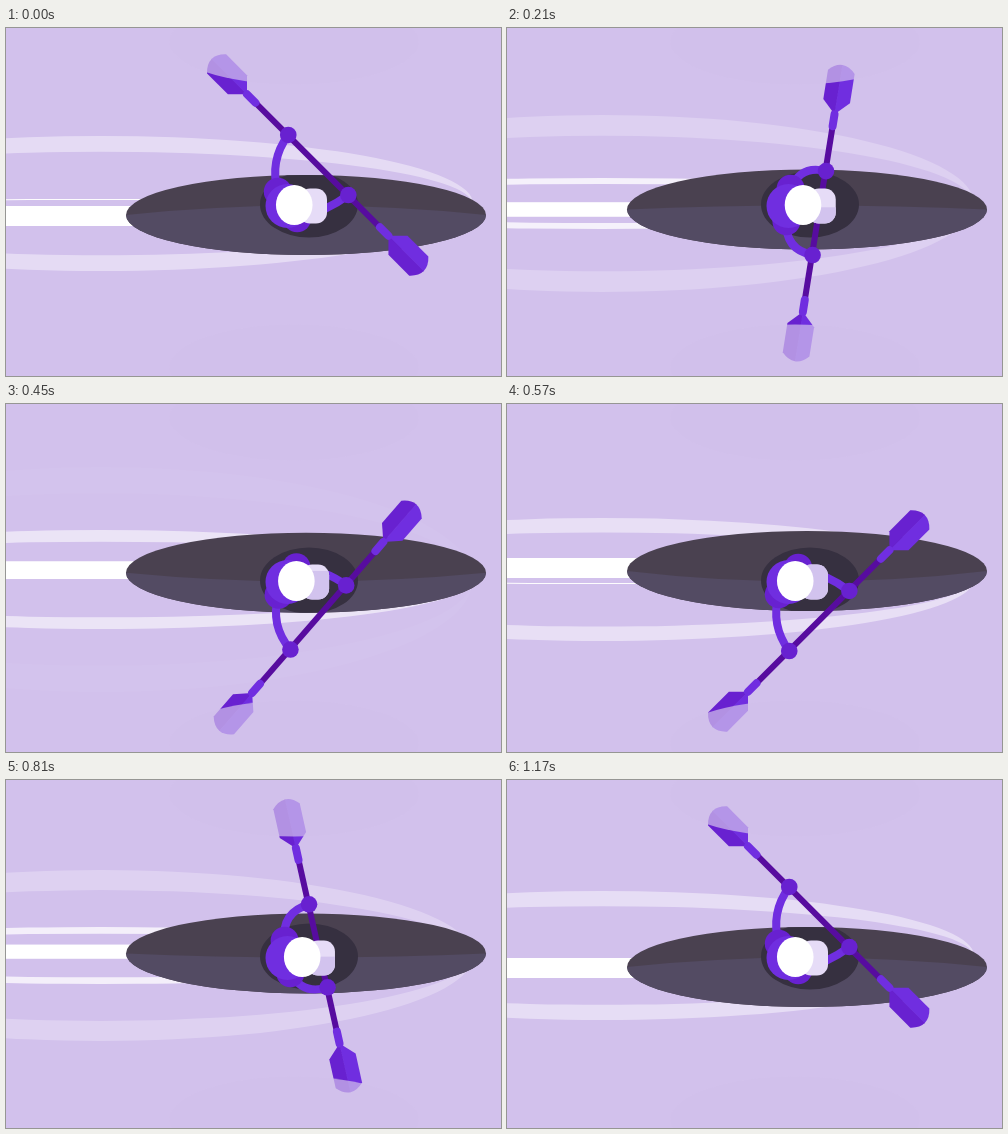
Write an HTML page with a canvas that moves like this. It is 495 px wide and 348 px high and loops after 1200 ms.

```html
<!DOCTYPE html>
<html lang="en">
<head>
<meta charset="utf-8">
<title>Kayak</title>
<style>
  html, body { margin: 0; width: 100%; height: 100%; overflow: hidden; background: #d2c1ec; }
  canvas { display: block; }
</style>
</head>
<body>
<canvas id="stage" width="495" height="348"></canvas>
<script>
const ctx = document.getElementById('stage').getContext('2d');
const LOOP = 1200, STEP = 30, RIGHT_STROKE = 570, LEFT_STROKE = 600;
const WATER = '#d2c1ec', VIOLET = '#702ee0', DEEP = '#6821d0', SHAFT = '#570c9f';

const easeOut = p => 1 - (1 - p) ** 2;
const easeInOut = p => p < 0.5 ? 2 * p * p : 1 - 2 * (1 - p) ** 2;

function ellipse(x, y, rx, ry, fill) {
  ctx.beginPath();
  ctx.ellipse(x, y, rx, ry, 0, 0, Math.PI * 2);
  ctx.fillStyle = fill;
  ctx.fill();
}

const disc = (x, y, r, fill) => ellipse(x, y, r, r, fill);

function strokePath(width, color, cap) {
  ctx.lineWidth = width;
  ctx.strokeStyle = color;
  ctx.lineCap = cap;
  ctx.stroke();
}

function line(x1, y1, x2, y2, width, color, cap = 'butt') {
  ctx.beginPath();
  ctx.moveTo(x1, y1);
  ctx.lineTo(x2, y2);
  strokePath(width, color, cap);
}

// Everything the stroke drives, from the time in the loop.
function poseAt(t) {
  const first = t < RIGHT_STROKE;
  const p = first ? t / RIGHT_STROKE : Math.min(1, (t - RIGHT_STROKE) / LEFT_STROKE);
  const dir = first ? 1 : -1;
  const swing = dir * (2 * easeOut(p) - 1);
  const sway = dir * (1 - 2 * easeInOut(p));
  const peak = 0.42;
  const nod = p < peak ? easeInOut(p / peak) : easeInOut((1 - p) / (1 - peak));
  return { p, swing, sway, nod, angle: swing * Math.PI / 4, paddleY: 177 + 40 * swing };
}

// A wake ring widens at a steady rate and fades as it goes.
function drawRing(t, delay) {
  const ry = (t - delay + 45 + LOOP) % LOOP * 0.1;
  const alpha = 1 - ry / 116;
  if (ry < 3 || alpha <= 0) return;
  ctx.beginPath();
  ctx.ellipse(95, 175.5, 372, ry, 0, 0, Math.PI * 2);
  ctx.ellipse(95, 175.5, 371, ry * 0.765, 0, 0, Math.PI * 2);
  ctx.fillStyle = `rgba(255,255,255,${alpha})`;
  ctx.fill('evenodd');
}

function drawTrail({ p, sway }) {
  const height = 20 - 6.3 * easeInOut(1 - Math.abs(2 * p - 1));
  ctx.fillStyle = '#fff';
  ctx.fillRect(0, 176 + 12 * sway - height / 2, 150, height);
}

function drawBoat({ sway }) {
  const y = 177 + 10 * sway;
  ctx.save();
  ctx.beginPath();
  ctx.ellipse(300, y, 180, 40, 0, 0, Math.PI * 2);
  ctx.fillStyle = '#4a4150';
  ctx.fill();
  ctx.clip();
  ctx.beginPath();
  ctx.moveTo(120, y);
  ctx.quadraticCurveTo(300, 355 - y, 480, y);
  ctx.lineTo(480, 260);
  ctx.lineTo(120, 260);
  ctx.fillStyle = '#534b63';
  ctx.fill();
  ellipse(303, 176.5, 49, 33, '#363040');
  ctx.restore();
}

function bladeHalf(side, fill) {
  ctx.beginPath();
  ctx.moveTo(0, 100);
  ctx.lineTo(side * 13.5, 113.5);
  ctx.lineTo(side * 13.5, 143);
  ctx.quadraticCurveTo(side * 7, 150, 0, 150);
  ctx.fillStyle = fill;
  ctx.fill();
}

function drawPaddle({ angle, paddleY }) {
  ctx.save();
  ctx.translate(311.7, paddleY);
  ctx.rotate(angle);
  line(0, -90, 0, 90, 6, SHAFT);
  for (const end of [-1, 1]) {
    ctx.save();
    ctx.scale(1, end);
    ctx.fillStyle = DEEP;
    ctx.fillRect(-0.5, 101, 1, 49);
    bladeHalf(-1, DEEP);
    bladeHalf(1, VIOLET);
    line(0, 88, 0, 100, 8, VIOLET, 'round');
    ctx.restore();
  }
  ctx.restore();

  // Water covering a dipped blade
  ctx.globalAlpha = 0.7;
  ellipse(288, 14, 125, 42.5, WATER);
  ellipse(288, 339, 125, 42.5, WATER);
  ctx.globalAlpha = 1;
}

function drawPaddler({ angle, swing, sway, nod, paddleY }) {
  const lean = angle * 0.8;
  const arms = [-1, 1].map(side => ({
    side,
    sx: 281.5 - side * 16.5 * Math.sin(lean),
    sy: 177 + side * 16.5 * Math.cos(lean),
    hx: 312.3 - side * 42.5 * Math.sin(angle),
    hy: paddleY + side * 42.5 * Math.cos(angle)
  }));

  for (const { side, sx, sy, hx, hy } of arms) {
    const reach = -side * swing;
    const bow = 2 * (9 - 4 * reach * reach - 2 * reach);
    const dx = hx - sx, dy = hy - sy, len = Math.hypot(dx, dy);
    ctx.beginPath();
    ctx.moveTo(sx, sy);
    ctx.quadraticCurveTo(
      (sx + hx) / 2 - side * dy / len * bow,
      (sy + hy) / 2 + side * dx / len * bow,
      hx, hy);
    strokePath(8, VIOLET, 'round');
    disc(hx, hy, 8.3, DEEP);
  }
  for (const { sx, sy } of arms) disc(sx, sy, 14, DEEP);
  disc(281.5, 178, 22, VIOLET);

  const x = 290 + 8 * nod;
  const split = 177.5 + 19 * sway ** 3;
  ctx.save();
  ctx.beginPath();
  ctx.roundRect(x + 3, 160.5, 28, 35, 11);
  ctx.fillStyle = '#e6dcf7';
  ctx.fill();
  ctx.clip();
  ctx.fillStyle = '#d2c3ee';
  ctx.fillRect(x, split, 34, 40);
  ctx.restore();
  ellipse(x - 1.75, 177, 18.3, 20, '#fff');
}

const start = performance.now();

function draw() {
  const elapsed = (performance.now() - start) % LOOP;
  const t = Math.floor(elapsed / STEP) * STEP;
  const pose = poseAt(t);
  ctx.fillStyle = WATER;
  ctx.fillRect(0, 0, 495, 348);
  drawRing(t, 0);
  drawRing(t, RIGHT_STROKE);
  drawTrail(pose);
  drawBoat(pose);
  drawPaddle(pose);
  drawPaddler(pose);
  requestAnimationFrame(draw);
}
draw();
</script>
</body>
</html>
```
